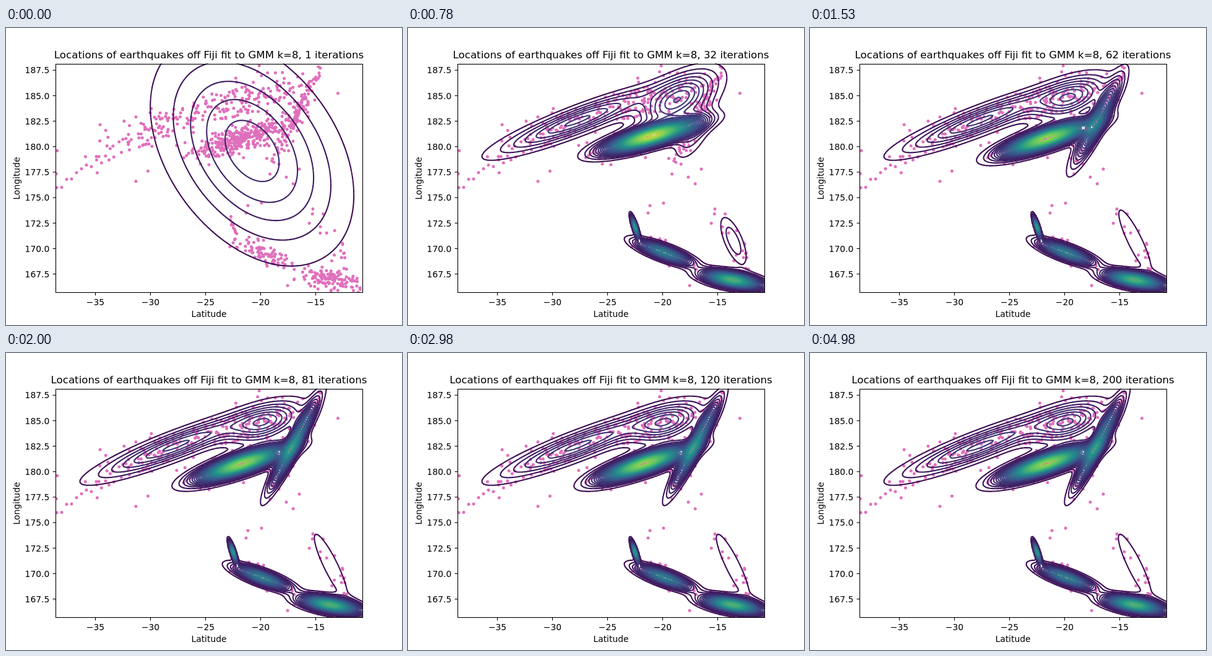
These frames come from a looping animation (640x480 px, 5.01 s). An HTML page with a canvas:

```html
<!DOCTYPE html>
<html lang="en">
<head>
<meta charset="utf-8">
<title>Mixture fit</title>
<style>
  html, body { margin: 0; width: 100%; height: 100%; overflow: hidden; background: #fff; }
  canvas, svg { position: absolute; left: 0; top: 0; width: 640px; height: 480px; display: block; }
  text { font: 13.89px "DejaVu Sans", sans-serif; fill: #000; }
  #title { font-size: 16.67px; }
</style>
</head>
<body>
<canvas id="plot" width="640" height="480"></canvas>
<svg id="axes" viewBox="0 0 640 480">
  <rect x="80.5" y="58.5" width="496" height="369" fill="none" stroke="#000" stroke-width="1.11"/>
  <text id="title" x="328" y="49.2" text-anchor="middle"></text>
  <text x="328" y="467" text-anchor="middle">Latitude</text>
  <text transform="translate(21.5 243) rotate(-90)" text-anchor="middle">Longitude</text>
</svg>
<script>
const LOOP = 5010, LAST = 200;
const BOX = { x: 80, y: 57.6, w: 496, h: 369.6 };
const STEP = 2, COLS = BOX.w / STEP + 1, ROWS = Math.ceil(BOX.h / STEP) + 1;
const LEVEL = 3.41e-6;   // density between neighbouring contours, per square pixel
const TOP = 45;          // contour number at the end of the colour scale

const svg = document.getElementById('axes');
const title = document.getElementById('title');
const ctx = document.getElementById('plot').getContext('2d');

// ---------- axes ----------
function add(tag, attrs, text) {
  const el = document.createElementNS(svg.namespaceURI, tag);
  for (const k in attrs) el.setAttribute(k, attrs[k]);
  if (text) el.textContent = text;
  svg.appendChild(el);
}
function tick(d) { add('path', { d, stroke: '#000', 'stroke-width': 1.11 }); }
for (let v = 35; v >= 15; v -= 5) {
  const x = 144.5 + (35 - v) * 17.8;
  tick(`M${x} 427.5v4.9`);
  add('text', { x, y: 447.6, 'text-anchor': 'middle' }, '\u2212' + v);
}
for (let v = 167.5; v <= 187.5; v += 2.5) {
  const y = 397.7 - (v - 167.5) * 16.475;
  tick(`M80.5 ${y}h-4.9`);
  add('text', { x: 70.3, y: y + 5.2, 'text-anchor': 'end' }, v.toFixed(1));
}

// ---------- mixture ----------
// A Gaussian by weight, centre, deviations along its two axes, and tilt.
function gauss(w, x, y, major, minor, deg) {
  const c = Math.cos(deg * Math.PI / 180), s = Math.sin(deg * Math.PI / 180);
  const a = major * major, b = minor * minor;
  return { w, x, y, xx: a * c * c + b * s * s, xy: (a - b) * c * s, yy: a * s * s + b * c * c };
}

const whole = w => gauss(w, 397.7, 198.7, 111.7, 73, 53.9);
const cloud = w => gauss(w, 409, 153, 57.5, 24.5, -32);
const ridge = w => gauss(w, 402, 356, 34, 6.2, 28);
const patch = gauss(.0167, 526, 344, 28, 9.8, 67);

// Poses of each component at the iterations in KEYS; the last pose holds.
const KEYS = [1, 15, 32, 81];
const mixture = [
  // dense band
  [whole(.34), cloud(.34), gauss(.355, 392, 175, 45, 9.2, -16), gauss(.335, 381, 179, 44, 9.4, -18.5)],
  // steep streak
  [whole(.15), cloud(.15), gauss(.03, 462, 165, 32, 14, -62), gauss(.125, 464, 149, 45, 6.6, -62.5)],
  // upper cluster
  [whole(.13), cloud(.13), gauss(.165, 435, 117, 43, 20, -32), gauss(.105, 418, 113, 39, 16.5, -18)],
  // long left arm
  [whole(.155), gauss(.155, 270, 165, 82, 22, -15), gauss(.165, 274, 150, 83, 12.8, -21)],
  // lower ridge, right and left
  [whole(.105), gauss(.105, 505, 399, 40, 6.5, 14), gauss(.13, 524, 407, 28, 7.4, 10)],
  [whole(.08), ridge(.08), gauss(.08, 414, 363, 28, 6.8, 20)],
  // thin spur
  [whole(.01), ridge(.01), gauss(.0118, 367, 322, 10.5, 2.1, 72)],
  // sparse patch on the right
  [whole(.0167), patch, patch, gauss(.021, 525, 344, 54, 10.5, 64)]
];

function pose(poses, n) {
  let i = 0;
  while (i < KEYS.length - 1 && n >= KEYS[i + 1]) i++;
  const end = poses.length - 1;
  if (i >= end) return poses[end];
  const u = 1 - (1 - (n - KEYS[i]) / (KEYS[i + 1] - KEYS[i])) ** 2;
  const mix = {};
  for (const k in poses[i]) mix[k] = poses[i][k] + (poses[i + 1][k] - poses[i][k]) * u;
  return mix;
}

// ---------- earthquakes ----------
let seed = 11;
function rand() {
  seed = (seed * 16807) % 2147483647;
  return seed / 2147483647;
}
const normal = () => Math.sqrt(-2 * Math.log(rand())) * Math.cos(2 * Math.PI * rand());

const dots = new Path2D();
function dot(x, y) {
  dots.moveTo(x + 2.5, y);
  dots.arc(x, y, 2.5, 0, 7);
}
// The data are drawn from the fitted mixture.
for (const poses of mixture) {
  const { w, x, y, xx, xy, yy } = poses[poses.length - 1];
  for (let i = 0; i < w * 1000; i++) {
    const dx = normal() * Math.sqrt(xx);
    dot(x + dx, y + dx * xy / xx + normal() * Math.sqrt(yy - xy * xy / xx));
  }
}
// A thin trail at the far left and a few strays in the middle.
for (let i = 0; i < 9; i++) dot(82 + i * 8, 260 - i * 6.5 + normal() * 4);
for (const [x, y] of [[474, 228], [453, 241], [413, 283], [391, 287], [388, 299]]) dot(x, y);

// ---------- contours ----------
const field = new Float64Array(COLS * ROWS);
function fillField(n) {
  field.fill(0);
  for (const poses of mixture) {
    const { w, x, y, xx, xy, yy } = pose(poses, n);
    const det = xx * yy - xy * xy;
    const peak = w / (2 * Math.PI * Math.sqrt(det) * LEVEL);
    for (let r = 0, k = 0; r < ROWS; r++) {
      const dy = BOX.y + r * STEP - y;
      for (let c = 0; c < COLS; c++, k++) {
        const dx = BOX.x + c * STEP - x;
        const q = (yy * dx * dx - 2 * xy * dx * dy + xx * dy * dy) / det;
        if (q < 18) field[k] += peak * Math.exp(-q / 2);
      }
    }
  }
}

// Marching squares over the field, one path per level.
function contours() {
  const paths = [];
  for (let r = 0; r < ROWS - 1; r++) {
    for (let c = 0; c < COLS - 1; c++) {
      const k = r * COLS + c;
      const tl = field[k], tr = field[k + 1], bl = field[k + COLS], br = field[k + COLS + 1];
      const low = Math.floor(Math.min(tl, tr, bl, br)) + 1;
      const high = Math.floor(Math.max(tl, tr, bl, br));
      const x = BOX.x + c * STEP, y = BOX.y + r * STEP;
      for (let v = low; v <= high; v++) {
        const p = [];
        if (tl < v !== tr < v) p.push(x + STEP * (v - tl) / (tr - tl), y);
        if (tr < v !== br < v) p.push(x + STEP, y + STEP * (v - tr) / (br - tr));
        if (bl < v !== br < v) p.push(x + STEP * (v - bl) / (br - bl), y + STEP);
        if (tl < v !== bl < v) p.push(x, y + STEP * (v - tl) / (bl - tl));
        const path = paths[v] || (paths[v] = new Path2D());
        for (let i = 0; i + 3 < p.length; i += 4) {
          path.moveTo(p[i], p[i + 1]);
          path.lineTo(p[i + 2], p[i + 3]);
        }
      }
    }
  }
  return paths;
}

const SCALE = [[62, 6, 80], [59, 82, 139], [33, 145, 140], [94, 201, 98], [253, 231, 37]];
function colour(v) {
  const u = Math.min(1, v / TOP) * (SCALE.length - 1);
  const i = Math.min(SCALE.length - 2, Math.floor(u));
  return `rgb(${SCALE[i].map((a, j) => Math.round(a + (SCALE[i + 1][j] - a) * (u - i)))})`;
}

// ---------- playback ----------
function draw(n) {
  title.textContent = `Locations of earthquakes off Fiji fit to GMM k=8, ${n} iterations`;
  ctx.clearRect(0, 0, 640, 480);
  ctx.save();
  ctx.beginPath();
  ctx.rect(BOX.x, BOX.y, BOX.w, BOX.h);
  ctx.clip();
  ctx.fillStyle = '#e070bc';
  ctx.fill(dots);
  ctx.lineWidth = 2.08;
  ctx.lineCap = 'square';
  fillField(n);
  contours().forEach((path, v) => {
    ctx.strokeStyle = colour(v);
    ctx.stroke(path);
  });
  ctx.restore();
}

// Iterations last 30 ms and 20 ms in turn.
function iteration(t) {
  return Math.min(LAST, 2 * Math.floor(t / 50) + (t % 50 >= 30 ? 2 : 1));
}

const start = performance.now();
let shown = 0;
function play() {
  const n = iteration((performance.now() - start) % LOOP);
  if (n !== shown) draw(shown = n);
  requestAnimationFrame(play);
}
play();
</script>
</body>
</html>
```
